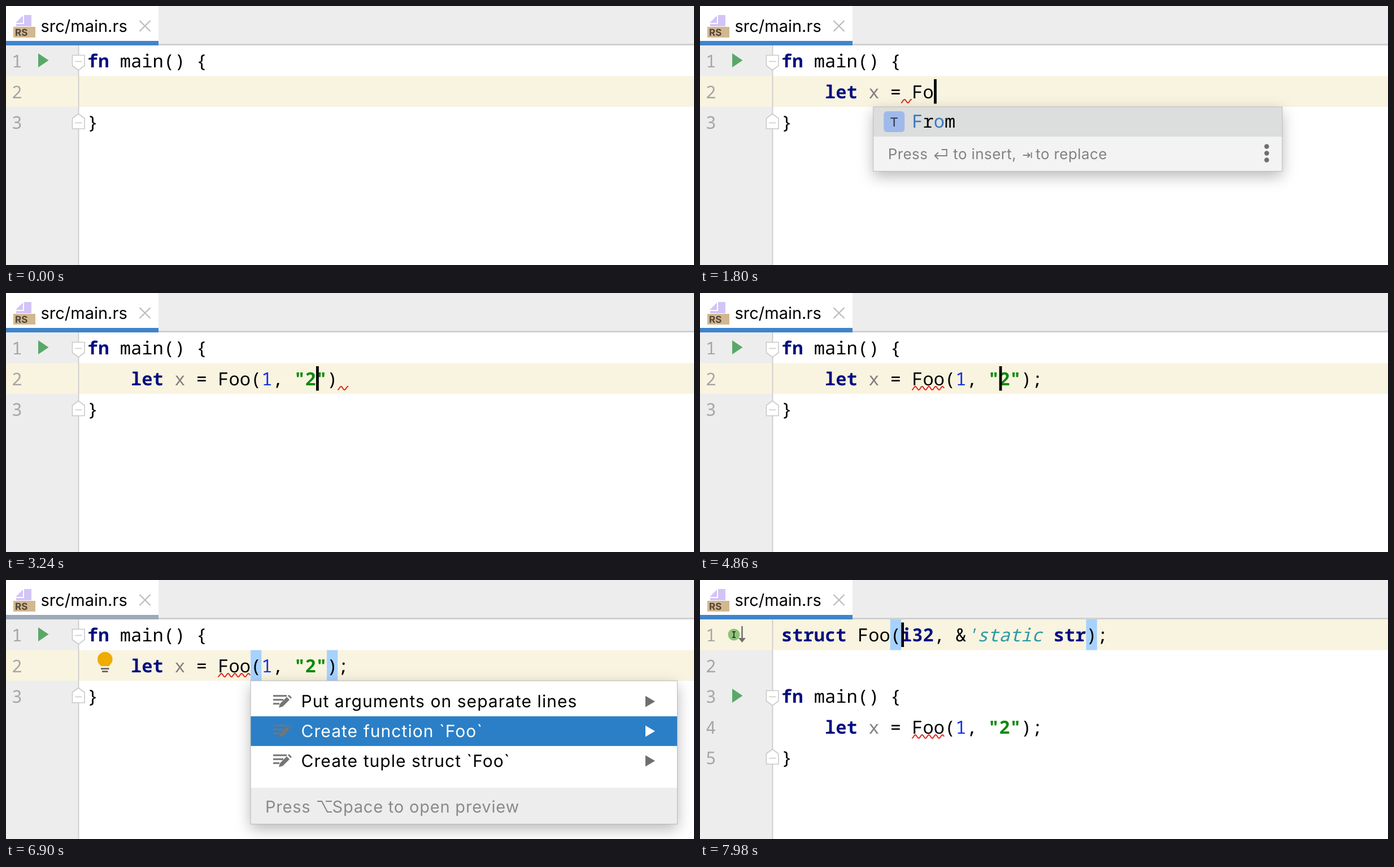
An HTML page for the animation above (8000 ms loop, 1218x460 px).

```html
<!DOCTYPE html>
<html lang="en">
<head>
<meta charset="utf-8">
<title>Create tuple struct</title>
<style>
  html, body { margin: 0; width: 100%; height: 100%; overflow: hidden; background: #fff; }
  svg { display: block; width: 1218px; height: 460px; text-rendering: geometricPrecision; }
  .code text, .num { font: 32.12px "Noto Sans Mono", "DejaVu Sans Mono", monospace; white-space: pre; }
  .num { fill: #a6a6a6; font-size: 31px; }
  .code .kw { fill: #000f80; font-weight: 700; }
  .code .str { fill: #0a8a0a; font-weight: 700; }
  .code .int { fill: #1232e8; }
  .code .life { fill: #2b9aa5; font-style: italic; }
  .code .dim { fill: #808080; }
  .code .hit { fill: #3a78bd; }
  .ui { font-family: Inter, Roboto, sans-serif; }
  .item { font-size: 30px; letter-spacing: 1.05px; }
  .hint { font-size: 26px; letter-spacing: .4px; fill: #828282; }
  .foot { font-size: 29px; letter-spacing: .8px; fill: #8a8a8a; }
  .line { fill: none; stroke: #828282; stroke-width: 2; }
  .fold { fill: #fff; stroke: #c9c9c9; stroke-width: 1.6; }
  .popup { filter: drop-shadow(0 9px 13px rgba(0, 0, 0, .28)); }
  .wave { fill: none; stroke: #e0261c; stroke-width: 2; }
  .bracket { fill: #a6d2ff; }
</style>
</head>
<body>
<svg viewBox="0 0 1218 460">
  <defs>
    <g id="edit">
      <path d="M0-10H24M0-3H18M0 4H11" fill="none" stroke="#757575" stroke-width="3"/>
      <path d="M10 11l2-7L24-8l5 5L17 9zM26-10l2-2 5 5-2 2z" fill="#757575"/>
    </g>
    <path id="next" d="M0-10L17 0 0 10z"/>
  </defs>

  <rect width="1218" height="460" fill="#fff"/>
  <rect y="70" width="128" height="390" fill="#ededed"/>
  <rect id="row" width="1218" height="54.5" fill="#f9f4e0"/>
  <path d="M128.5 70V460" stroke="#cdcdcd" stroke-width="1.8"/>

  <rect x="270" width="948" height="67" fill="#ededed"/>
  <rect x="270" y="67" width="948" height="3" fill="#d0d0d0"/>
  <rect id="underline" y="62" width="270" height="8"/>
  <path d="M17 30L30 17V30zM32 16H45V36H18V32H32z" fill="#d2c4f6"/>
  <rect x="13" y="37" width="39" height="19" fill="#d2b78f"/>
  <text class="ui" x="16" y="53" font-size="17" font-weight="700" fill="#514638">RS</text>
  <text class="ui" x="61.5" y="46" font-size="29">src/main.rs</text>
  <path d="M236.500 26L255.500 45M255.500 26L236.500 45" stroke="#bcbcbc" stroke-width="2.2"/>

  <g id="numbers"></g>

  <g id="block">
    <path d="M57 84L75.500 96.500 57 109z" fill="#59a869"/>
    <path class="fold" d="M117.500 87.500H139V106L128.200 114 117.500 106zM122 98.500H134.500"/>
    <path class="fold" d="M117.500 218H139V199.500L128.200 191.500 117.500 199.500zM122 207.500H134.500"/>
    <g id="brackets"></g>
    <g class="code" id="frame"></g>
    <g class="code" id="typed"></g>
    <path id="wave" class="wave"/>
  </g>

  <g id="struct">
    <g id="structBrackets"></g>
    <g class="code" id="structCode"></g>
    <g id="marker">
      <circle cx="60" cy="97" r="10.500" fill="#90c27d"/>
      <path d="M57 92H63M57 102H63M60 92V102" stroke="#30442a" stroke-width="2"/>
      <path d="M74.500 82V106" stroke="#6e6e6e" stroke-width="2.500"/>
      <path d="M68 103H81L74.500 111z" fill="#6e6e6e"/>
    </g>
  </g>

  <g id="bulb">
    <path d="M168 153C165 149 162 147 162 141a13.300 13.300 0 0 1 26.600 0C188.600 147 185 149 182.500 153z" fill="#eeac05"/>
    <path d="M168 157.500H182.500M170 162.500H180.500" stroke="#6e6e6e" stroke-width="3"/>
  </g>

  <rect id="caret" width="4.800" height="43.500"/>

  <g id="completions"></g>

  <g id="menu">
    <rect class="popup" x="433" y="179" width="755.500" height="254.500" fill="#fff"/>
    <rect x="433" y="369" width="755.500" height="64.500" fill="#ededed"/>
    <rect id="selection" x="433" width="755.500" height="52.700" fill="#2a7fc7"/>
    <g id="items"></g>
    <g class="ui foot">
      <text x="459" y="413">Press</text>
      <text x="577.500" y="413">Space to open preview</text>
    </g>
    <path class="line" d="M551 393H559L569 412H577M566 393H577" stroke-width="2.400"/>
    <rect x="433" y="179" width="755.500" height="254.500" fill="none" stroke="#b8b8b8"/>
  </g>
</svg>
<script>
const LOOP = 8000, LEFT = 144, CELL = 19.27, ROW = 54.5, TOP = 70;
const KEYWORDS = ["fn", "let", "struct", "i32", "str"];
const $ = id => document.getElementById(id);
const colX = col => LEFT + col * CELL;

function add(parent, tag, attrs, text) {
  const node = document.createElementNS("http://www.w3.org/2000/svg", tag);
  for (const key in attrs) node.setAttribute(key, attrs[key]);
  if (text) node.textContent = text;
  parent.append(node);
  return node;
}

function tokenClass(token, unused) {
  if (token[0] === '"') return "str";
  if (token[0] === "'") return "life";
  if (/^\d/.test(token)) return "int";
  if (KEYWORDS.includes(token)) return "kw";
  return unused && token === "x" ? "dim" : "";
}

function drawCode(parent, source, line, unused) {
  parent.replaceChildren();
  appendCode(parent, source, line, unused);
}

function appendCode(parent, source, line, unused) {
  for (const m of source.matchAll(/"[^"]*"|'\w+|\w+|[^\s\w"']+/g)) {
    const attrs = { x: colX(m.index), y: 109 + line * ROW, class: tokenClass(m[0], unused) };
    add(parent, "text", attrs, m[0]);
  }
}

// Marks the bracket pair when the caret touches either bracket.
function drawBrackets(parent, source, caret, line) {
  parent.replaceChildren();
  const pair = [source.indexOf("("), source.indexOf(")")];
  if (pair[0] < 0 || !pair.some(c => caret === c || caret === c + 1)) return;
  for (const c of pair)
    add(parent, "rect", { class: "bracket", x: colX(c), y: TOP + line * ROW, width: CELL, height: ROW });
}

function wavePath([col, length]) {
  const points = [];
  for (let x = 0; x <= length * CELL; x++)
    points.push(`${(colX(col) + x).toFixed(1)} ${(169 + 3 * Math.cos(x * Math.PI / 6)).toFixed(2)}`);
  return "M" + points.join("L");
}

function addCompletion(col, width, letter, word, hits) {
  const left = colX(col) - 68.5;
  const g = add($("completions"), "g", { transform: `translate(${left} 179)` });
  add(g, "rect", { class: "popup", width, height: 114.5, fill: "#f3f3f3" });
  add(g, "rect", { width, height: 53, fill: "#dcdddd" });
  add(g, "rect", { x: 18.5, y: 8, width: 37, height: 37, rx: 6, fill: "#9fb9ea" });
  add(g, "text", { class: "ui", x: 37, y: 34.5, "font-size": 22, "font-weight": 500,
    "text-anchor": "middle", fill: "#39435a" }, letter);
  const label = add(g, "g", { class: "code" });
  [...word].forEach((ch, i) => add(label, "text",
    { x: 68.5 + i * CELL, y: 37, class: hits.includes(ch) ? "hit" : "" }, ch));
  const hint = add(g, "g", { class: "ui hint" });
  add(hint, "text", { x: 26, y: 93 }, "Press");
  add(hint, "text", { x: 141.5, y: 93 }, "to insert,");
  add(hint, "text", { x: 287.5, y: 93 }, "to replace");
  add(g, "path", { class: "line", d: "M121 76H130V87H109M115 81L109 87 115 93" });
  add(g, "path", { class: "line", d: "M265 86H277M273 82L277 86 273 90M280 81V91" });
  for (const y of [70.5, 82.5, 94.5]) add(g, "circle", { cx: width - 27.5, cy: y, r: 4.2, fill: "#6e6e6e" });
  add(g, "rect", { width, height: 114.5, fill: "none", stroke: "#bdbdbd" });
  return g;
}

// time, statement, caret column, error underline [column, length]
const GAP = [11, 1], NAME = [12, 3];
const CALL = 'let x = Foo(1, "2")', DONE = CALL + ";";
const EDITS = [
  [0, "", -1],
  [300, "l", 5],
  [420, "le", 6],
  [540, "let", 7],
  [660, "let", 8],
  [780, "let x", 9],
  [1080, "let x", 10],
  [1140, "let x =", 11],
  [1320, "let x =", 12],
  [1380, "let x =", 12, GAP],
  [1560, "let x = F", 13, GAP],
  [1740, "let x = Fo", 14, GAP],
  [1980, "let x = Foo", 15, GAP],
  [2400, "let x = Foo()", 16, GAP],
  [2520, "let x = Foo(1)", 17, GAP],
  [2640, "let x = Foo(1,)", 18, GAP],
  [2700, "let x = Foo(1, )", 19, GAP],
  [3000, 'let x = Foo(1, "")', 20, [22, 1]],
  [3240, CALL, 21, [23, 1]],
  [3480, CALL, 22, [23, 1]],
  [3600, CALL, 23, [23, 1]],
  [3840, DONE, 24, [24, 1]],
  [4140, DONE, 24],
  [4380, DONE, 23],
  [4500, DONE, 22, NAME],
  [4620, DONE, 21, NAME],
  [4740, DONE, 20, NAME],
  [4920, DONE, 19, NAME],
  [5040, DONE, 18, NAME],
  [5160, DONE, 17, NAME],
  [5280, DONE, 16, NAME],
  [5400, DONE, 15, NAME]
];
const MENU_OPEN = 6180, MENU_STEPS = [6600, 6960], MENU_CLOSE = 7260;
const INSERTED = 7500, RESOLVED = 7860;
const STRUCT = "struct Foo(i32, &'static str);";

const numbers = [1, 2, 3, 4, 5].map(n =>
  add($("numbers"), "text", { class: "num", x: 10, y: 109 + (n - 1) * ROW }, n));
appendCode($("frame"), "fn main() {", 0);
appendCode($("frame"), "}", 2);
appendCode($("structCode"), STRUCT, 0);
drawBrackets($("structBrackets"), STRUCT, 11, 0);

const completions = [
  { node: addCompletion(8, 687, "M", "sandbox", "x"), from: 840, to: 1080 },
  { node: addCompletion(12, 724, "T", "From", "Fo"), from: 1680, to: 2040 }
];
const items = ["Put arguments on separate lines", "Create function `Foo`", "Create tuple struct `Foo`"]
  .map((label, i) => {
    const g = add($("items"), "g", { transform: `translate(0 ${215.8 + i * 52.7})` });
    add(g, "use", { href: "#edit", x: 473 });
    add(g, "text", { class: "ui item", x: 522.5, y: 10.5 }, label);
    add(g, "use", { href: "#next", x: 1132, class: "arrow" });
    return g;
  });

const show = (node, on) => { node.style.display = on ? "" : "none"; };
let drawn = null;

function drawEdit(edit) {
  if (edit === drawn) return;
  drawn = edit;
  const [time, statement, caret, wave] = edit;
  const source = "    " + statement;
  drawCode($("typed"), source, 1, time >= 1380);
  drawBrackets($("brackets"), source, caret, 1);
  $("wave").setAttribute("d", wave ? wavePath(wave) : "");
}

function render(t) {
  const edit = EDITS.findLast(e => e[0] <= t);
  const inserted = t >= INSERTED, menu = t >= MENU_OPEN && t < MENU_CLOSE;
  drawEdit(edit);

  $("block").setAttribute("transform", `translate(0 ${inserted ? 2 * ROW : 0})`);
  $("row").setAttribute("y", inserted ? TOP : TOP + ROW);
  $("underline").setAttribute("fill", menu ? "#9ca9b9" : "#4084cb");
  numbers.forEach((node, i) => show(node, i < 3 || inserted));
  show($("brackets"), !inserted);
  show($("struct"), inserted);
  show($("structBrackets"), t >= RESOLVED);
  show($("marker"), t >= RESOLVED);
  show($("bulb"), t >= MENU_OPEN && !inserted);

  const caretCol = inserted ? 11 : edit[2];
  show($("caret"), caretCol >= 0 && !(t >= 5880 && t < MENU_CLOSE));
  $("caret").setAttribute("x", colX(caretCol) + 0.3);
  $("caret").setAttribute("y", inserted ? 75.5 : 130);

  for (const c of completions) show(c.node, t >= c.from && t < c.to);

  show($("menu"), menu);
  const selected = MENU_STEPS.filter(step => t >= step).length;
  $("selection").setAttribute("y", 189.4 + selected * 52.7);
  items.forEach((g, i) => {
    g.children[1].setAttribute("fill", i === selected ? "#fff" : "#000");
    g.children[2].setAttribute("fill", i === selected ? "#fff" : "#6e6e6e");
  });
}

const start = performance.now();
function tick() {
  render((performance.now() - start) % LOOP);
  requestAnimationFrame(tick);
}
tick();
</script>
</body>
</html>
```
